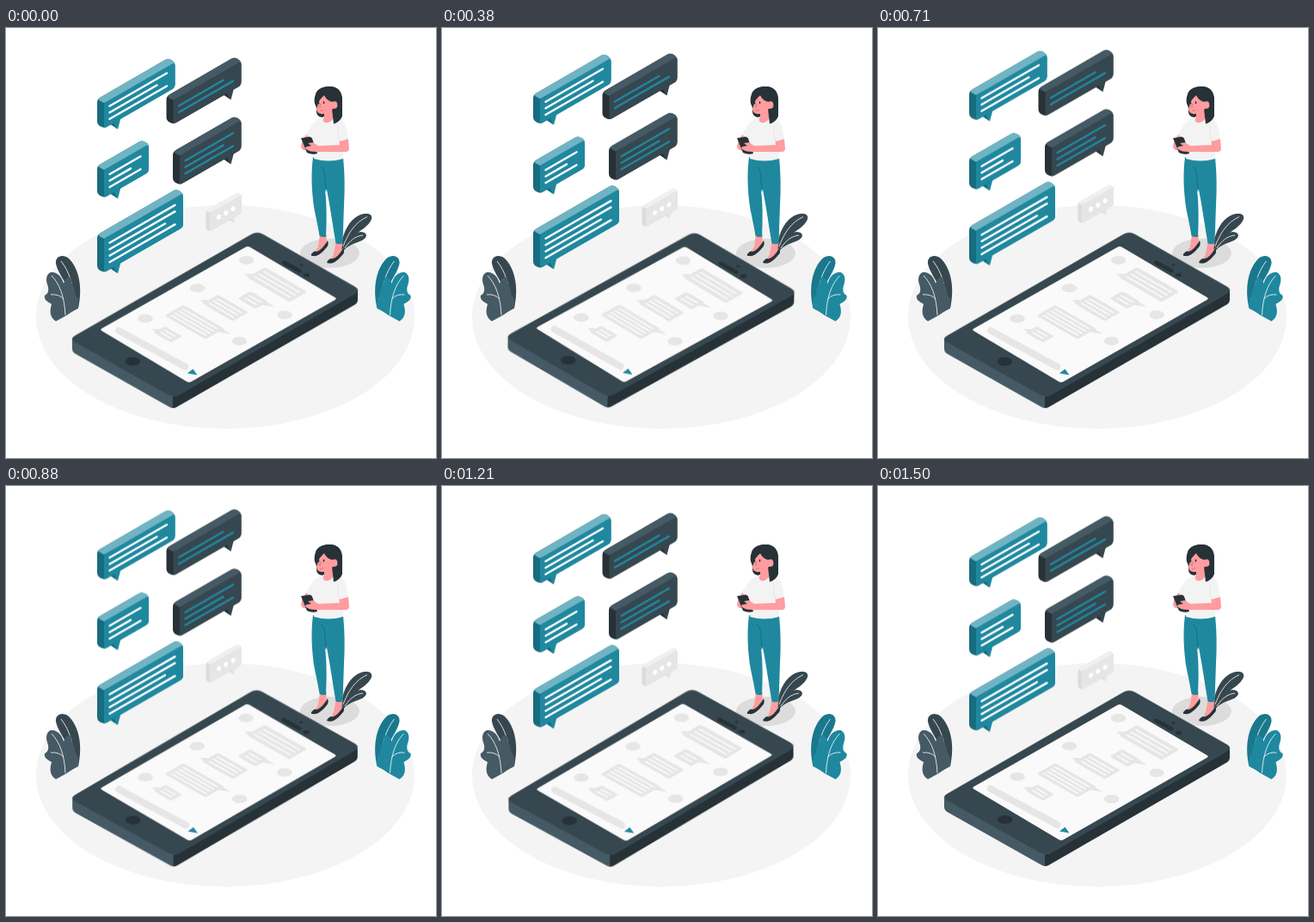
An HTML page that plays this animation: 500 by 500 pixels, repeating every 1.54 s.

```html
<!DOCTYPE html>
<html lang="en">
<head>
<meta charset="utf-8">
<title>Chat messages</title>
<style>
  html, body { margin: 0; width: 100%; height: 100%; overflow: hidden; background: #fff; }
  svg { display: block; width: 100%; height: 100%; }
  #phone { transform-origin: 243px 339px; }
  .skin { fill: #ff9c9f; }
  .dark { fill: #263238; }
  .vein { fill: none; stroke: #fff; stroke-width: .8; }
</style>
</head>
<body>
<svg viewBox="0 0 500 500">
  <defs>
    <linearGradient id="rim" gradientUnits="userSpaceOnUse" x1="194" x2="195" y1="0" y2="0">
      <stop offset=".5" stop-color="#455a64"/>
      <stop offset=".5" stop-color="#263238"/>
    </linearGradient>
    <g id="backLeaf">
      <path d="M84 326C89 304 86 281 73 268C65 262 57 266 58 274C60 284 67 291 71 302L76 330Z"/>
      <path class="vein" d="M64 271C74 284 79 300 78 318"/>
    </g>
    <g id="frontLeaf">
      <path d="M58 341C50 336 51 328 53 321C47 318 44 315 45 311C50 309 50 303 48 298C46 292 47 286 52 284C60 283 65 290 67 297Q70 288 76 290C74 298 82 302 80 309Q86 315 84 325Q72 334 58 341Z"/>
      <path class="vein" d="M53 288C62 297 68 312 69 334M52 310Q61 309 67 315"/>
    </g>
  </defs>

  <ellipse cx="255" cy="336" rx="220" ry="130" fill="#f4f4f4"/>
  <ellipse cx="376.5" cy="262" rx="34.5" ry="17" fill="#dcdcdc"/>

  <use href="#backLeaf" fill="#37474f"/>
  <use href="#frontLeaf" fill="#455a64"/>
  <g transform="matrix(-1 0 0 1 515.5 0)">
    <use href="#backLeaf" fill="#1a788d"/>
    <use href="#frontLeaf" fill="#1f889f"/>
  </g>

  <g id="phone">
    <path id="body" fill="url(#rim)"/>
    <path id="lid" fill="#37474f" stroke="#4d5f69" stroke-width=".4"/>
    <path id="screen" fill="#fafafa"/>
    <ellipse class="dark" cx="147.5" cy="388" rx="8.7" ry="5"/>
    <path d="M323 272.5L341.5 282.5" stroke="#263238" stroke-width="4.5" stroke-linecap="round"/>
    <ellipse class="dark" cx="349.5" cy="287" rx="3.7" ry="2.3"/>
    <ellipse class="dark" cx="343.5" cy="275.5" rx="2" ry="1.3"/>
    <path d="M131 352L208.5 394" stroke="#e6e6e6" stroke-width="8" stroke-linecap="round"/>
    <path d="M211 401.5L217.5 396.5L222.5 403.5Z" fill="#1f889f"/>
    <g id="chat" fill="#e6e6e6"></g>
  </g>

  <g fill="#37474f">
    <path d="M390 258C390 240 399 221 414 216.5C424 214 427.5 219 424 224.5C417 236 403 238 395 253Z"/>
    <path d="M390 262C395 247 404 237.500 413 237C420 237.5 421 243 415 246.5C406 251 398 251 390 262Z"/>
    <path class="vein" d="M392 254C398 238 406 226 420 219.5M394 256C400 247 406 242 415 241"/>
  </g>

  <g id="woman">
    <path class="skin" d="M365 240H373L372 251L365 260L359 262L363 254ZM383.5 249H391.5L390 260L383 268L377 271L381 263Z"/>
    <g id="shoe">
      <path class="dark" d="M355 263C358 259 360 259 361 260Q367 259 374 247Q376 253 372 256C367 262 362 266 357 265Q354 265 355 263Z"/>
    </g>
    <use href="#shoe" x="18.500" y="8.500"/>
    <path fill="#1f889f" d="M357 150Q374 156 392 150C394 170 394 188 393 206L391.500 250.500Q387 252 383.500 250.500C380 230 377 208 373 188L371 188C373 205 373 222 372 242.500Q368 244 364.500 241.500C362 225 358 212 357 200C355 182 355 166 357 150Z"/>
    <path d="M366 161Q371 164 371 176L372 190" fill="none" stroke="#176f83"/>
    <path class="dark" d="M360 80C359 72 367 68 376 68C386 68 391 74 391 84V102Q388 110 381 111L378 98L368 104Q361 103 361 97Z"/>
    <path class="skin" d="M350 122L357 126L354 134L350 142Q344 143 343 138L344 133Z"/>
    <path fill="#f3f3f3" d="M369 103.5Q361 106 357 111L348.5 124L357 130L358 152Q375 157 392 152V131L398 129C396 114 394 108 388 105L383 103.5Z"/>
    <path d="M386 114Q385 123 388 132" fill="none" stroke="#e2e2e2" stroke-width=".8"/>
    <path class="skin" d="M370 95L381 91V104Q378 111 371 110Q367 108 370 103Z"/>
    <path class="dark" d="M379 94H391V102Q388 110 381 111.500Z"/>
    <path class="skin" d="M361 85Q366 83 370 78Q374 86 381 86L379 96Q374 100 367 100Q361 99 361 94Z"/>
    <path class="dark" d="M359 88C357 74 366 68 376 68C387 68 391 75 391 85V97L385.5 95Q386 85 381 85.5Q373 84 370 78Q364 82 361.500 93Z"/>
    <ellipse class="skin" cx="382" cy="89.500" rx="3.400" ry="4.300"/>
    <path d="M363.5 86.5V88M369.5 86V87.5" stroke="#263238" stroke-width="1.5" stroke-linecap="round"/>
    <path d="M366 88L364.5 92H366M365 96Q367 97 369 95" fill="none" stroke="#d66673" stroke-width=".8"/>
    <path class="dark" d="M343 128L353 126.5Q355 126.5 356 128.5L362 146Q356 148 350 145Z"/>
    <path class="skin" d="M387.5 132L398 129L399 140Q399 144 395 144L362 144Q353 144 350 141.5Q347 140 349 138L355 137L351 134L357 133L363 137L388 136Z"/>
  </g>

  <g id="bubbles"></g>
</svg>

<script>
const NS = 'http://www.w3.org/2000/svg';
const $ = id => document.getElementById(id);
const SLOPE = 0.577;

function add(parent, tag, attrs) {
  const el = document.createElementNS(NS, tag);
  for (const k in attrs) el.setAttribute(k, attrs[k]);
  return parent.appendChild(el);
}

// Polygon path; a third value in a point rounds that corner.
function poly(pts) {
  const toward = (a, b, r) => {
    const k = r / Math.hypot(b[0] - a[0], b[1] - a[1]);
    return [a[0] + (b[0] - a[0]) * k, a[1] + (b[1] - a[1]) * k];
  };
  const n = pts.length;
  return pts.map((p, i) => {
    const r = p[2] || 0;
    const a = toward(p, pts[(i + n - 1) % n], r), b = toward(p, pts[(i + 1) % n], r);
    return `${i ? 'L' : 'M'}${a}Q${p[0]},${p[1]} ${b}`;
  }).join('') + 'Z';
}

const TEAL = { front: '#1f889f', top: '#70b4c3', side: '#176c7f', ink: '#fff' };
const DARK = { front: '#37474f', top: '#455a64', side: '#263238', ink: '#1f889f' };
const PALE = { front: '#e6e6e6', top: '#f0f0f0', side: '#dcdcdc', ink: '#fff' };

// Isometric speech bubble: x, y is the upper left corner of the front.
function bubble(color, x, y, w, h, rows, { tail = 0, depth = 8, r = 4, size = 1 } = {}) {
  const g = add($('bubbles'), 'g', {});
  const at = (u, v, d = 0, round = 0) =>
    [x + u - d, y + v - (u + d) * SLOPE + d * SLOPE * 0, round];
  const face = (pts, fill) => add(g, 'path', { d: poly(pts), fill });
  const back = (u, v) => [x + u - depth, y + v - (u + depth) * SLOPE, r];
  const spike = (from, to) => [[from, -from * SLOPE - 1], [16, 1], [to, -to * SLOPE - 1]]
    .map(([a, b]) => [x + tail + a * size, y + h - tail * SLOPE + b * size]);
  const rear = (u, v) => [x + u - depth, y + v - u * SLOPE - depth * SLOPE, r];

  face([rear(0, 0), rear(w, 0), at(w, 0, 0, r), at(w, h, 0, r), at(0, h, 0, r), rear(0, h)], color.side);
  face(spike(7, 12), color.side);
  face([rear(0, 0), rear(w, 0), at(w, 0, 0, r), at(w, r), at(0, 0)], color.top);
  face(spike(11, 19.5), color.front);
  face([at(0, 0, 0, r * .7), at(w, 0, 0, r), at(w, h, 0, r), at(0, h, 0, r * .7)], color.front);

  // Evenly spaced text rows, the last but one short.
  for (let i = 0; i < rows; i++) {
    const v = h / 2 + (i - (rows - 1) / 2) * 7.5;
    const a = at(6.5, v), b = at(w - (i === rows - 2 ? 21 : 9.5), v);
    add(g, 'path', { d: `M${a[0]} ${a[1]}L${b[0]} ${b[1]}`, stroke: color.ink,
      'stroke-width': 2.4, 'stroke-linecap': 'round' });
  }
  return at;
}

bubble(TEAL, 114, 87.3, 82.5, 29.5, 3);
bubble(DARK, 194.5, 84, 79, 28, 2, { tail: 51 });
bubble(TEAL, 114, 165, 52, 32.5, 3);
bubble(DARK, 202, 148.5, 71.5, 34, 3, { tail: 43.5 });
bubble(TEAL, 114, 245, 92, 39.5, 4);

const at = bubble(PALE, 237, 215, 37, 21.5, 0, { tail: 18, depth: 4.5, r: 3, size: .62 });
for (let i = 0; i < 3; i++) {
  const [cx, cy] = at(10.5 + i * 8.3, 10.8);
  add($('bubbles'), 'ellipse', { cx, cy, rx: 2.4, ry: 3, fill: '#fff',
    transform: `rotate(25 ${cx} ${cy})` });
}

// Phone: lid outline and a rim 13px below it.
const lid = [[73.5, 362], [292, 236], [412.5, 304.5], [194.5, 430.2]];
const rounded = (pts, r) => poly(pts.map(p => [...p, r]));
const [left, , right, near] = lid;
$('lid').setAttribute('d', rounded(lid, 8));
$('body').setAttribute('d', poly([
  [left[0] + 3.5, left[1]], [near[0], near[1] - 10], [right[0] - 3.5, right[1]],
  [right[0] - 3.5, right[1] + 15, 4], [near[0], near[1] + 13, 5], [left[0] + 3.5, left[1] + 15, 4]
]));
$('screen').setAttribute('d', rounded([[109, 351], [281, 253.3], [385, 314.5], [213, 412.8]], 3));

// Chat drawn flat, then laid on the ground plane.
function avatar(cx, cy) {
  add($('chat'), 'ellipse', { cx, cy, rx: 8.8, ry: 5.1 });
}
function message(x, y, w, h, rows, side) {
  const g = add($('chat'), 'g', { transform: `matrix(.866 .5 -.866 .5 ${x} ${y})` });
  add(g, 'rect', { width: w, height: h, rx: 2 });
  const tail = side < 0 ? [[2, h - 10], [2, h - 1], [-6, h - 3]] : [[w - 2, 1], [w + 11, 2], [w - 2, 9]];
  add(g, 'path', { d: poly(tail) });
  for (let i = 1; i <= rows; i++)
    add(g, 'path', { d: `M4 ${i * h / (rows + 1)}H${w - 4}`, stroke: '#fafafa', 'stroke-width': 2 });
}
avatar(279.5, 270);
avatar(222.5, 302.5);
avatar(162, 338);
avatar(324, 333.5);
avatar(271.5, 364);
message(301, 278, 57, 24, 3, -1);
message(246.5, 310, 41, 21, 3, -1);
message(284, 306, 24, 17, 2, 1);
message(206, 322, 55, 25, 4, 1);
message(185, 347, 23, 15, 2, -1);

const loop = { duration: 1540, delay: -40, iterations: Infinity, easing: 'linear' };
const lift = y => ({ transform: `translateY(${y}px)` });
const tilt = (deg, offset) => ({ transform: `rotate(${deg}deg)`, offset });
$('bubbles').animate([lift(.5), lift(-9.5), lift(.5)], loop);
$('phone').animate([tilt(0, 0), tilt(1, .25), tilt(-1, .75), tilt(0, 1)], loop);
</script>
</body>
</html>
```
